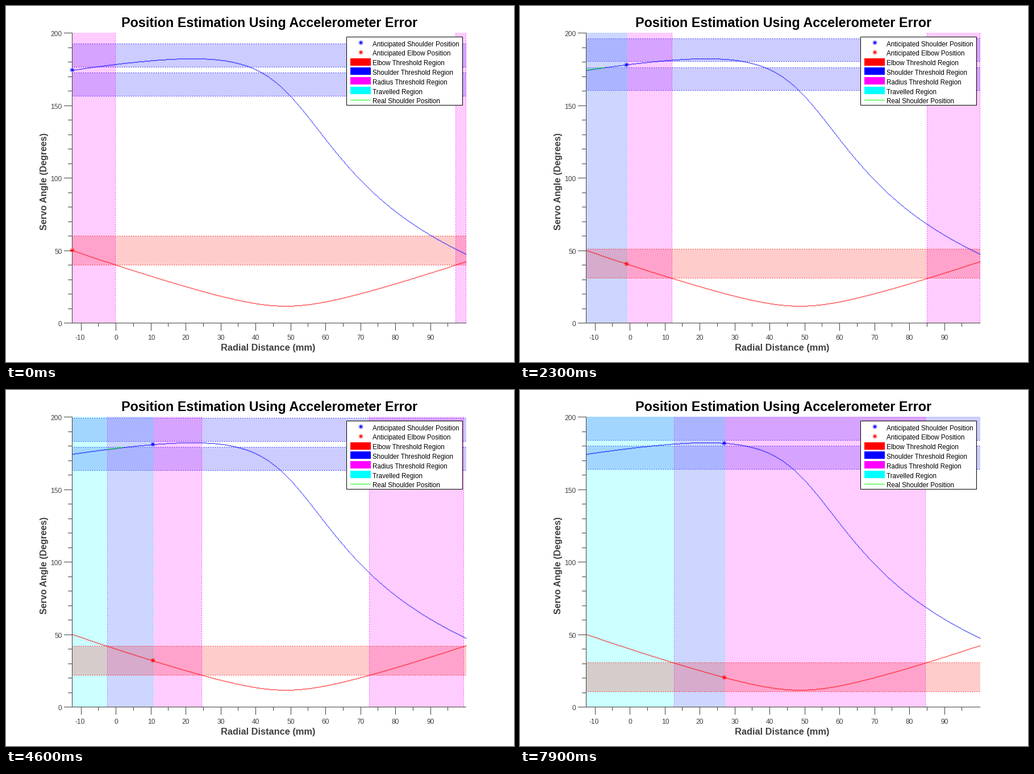
A matplotlib script for the animation above (8000 ms loop, 894 by 626 pixels).

```python
import numpy as np
import matplotlib.pyplot as plt
from matplotlib.animation import FuncAnimation
from matplotlib.patches import Rectangle

W, H, DPI = 894, 626, 72
XMIN, XMAX = -12.5, 100.2
MID = 48.55                    # radius at which the elbow angle is smallest
FRAMES, STEP = 80, 0.5
BLUE, RED, MAGENTA, CYAN, GREEN = "#0000ff", "#ff0000", "#ff00ff", "#00ffff", "#00ff00"
GRAY = "#404040"

plt.rcParams["font.family"] = "Liberation Sans"
fig = plt.figure(figsize=((W + 0.001) / DPI, (H + 0.001) / DPI), dpi=DPI, facecolor="white")
ax = fig.add_axes([0, 0, 1, 1])
ax.axis("off")


def px(x):
    return 193.5 + 6.15 * x


def py(v):
    return 557.5 - 2.55 * v


def center(p):
    """Middle of the pixel that holds p."""
    return np.floor(p) + 0.5


# Two-link arm: law of cosines for both servo angles.
def elbow(x):
    return np.degrees(np.arccos(1 - ((x - MID) ** 2 + 233) / 11014))


def elbow_offset(angle):
    """Distance from MID at which the elbow reaches the angle."""
    return np.sqrt(max(0, 11014 * (1 - np.cos(np.radians(angle))) - 233))


def shoulder(x):
    u = x - MID
    d = np.hypot(u, 24.05)
    bend = np.arccos((d * d - 2752) / (131.16 * d))
    return np.degrees(bend - np.arctan(u / 24.05)) + 26.35


def line(xs, ys, color, z):
    ax.plot(xs, ys, color=color, lw=1, zorder=z, snap=False)


def dots(xs, ys, color, z):
    return ax.plot(xs, ys, color=color, lw=1, ls=(0, (1, 3)),
                   dash_capstyle="butt", snap=False, zorder=z)[0]


def box(x0, y0, x1, y1, color, z, alpha=1.0):
    return ax.add_patch(Rectangle((x0, y0), x1 - x0, y1 - y0, fc=color, lw=0,
                                  alpha=alpha, zorder=z, snap=False))


def star(x, y, color, z):
    x, y, gap = center(x), center(y), np.nan
    dx = np.array([-4, 4, gap, 0, 0, gap, -3, 3, gap, -3, 3])
    dy = np.array([0, 0, gap, -4, 4, gap, -3, 3, gap, 3, -3])
    return ax.plot(x + dx, y + dy, color=color, lw=1, zorder=z, snap=False,
                   solid_capstyle="butt")[0]


def trace(f, a, b, color, z):
    """Crisp one-pixel curve: one run of pixels in each column."""
    cols = np.arange(np.floor(px(a)), np.floor(px(b)) + 2)
    rows = np.floor(py(f((cols + 0.5 - 193.5) / 6.15)))
    jump = np.diff(rows, append=rows[-1])
    size = np.maximum(1, np.abs(jump))
    top = np.where(jump < 0, rows - size + 1, rows)
    return ax.fill_between(cols, top, top + size, step="post", color=color, lw=0, zorder=z)


def label(x, y, s, size, color="black", ha="center", **kw):
    ax.text(x, y, s, fontsize=size, color=color, ha=ha, va="baseline", zorder=12, **kw)


def draw_axes():
    line([116.5, 116.5], [47.5, 557.5], GRAY, 6)
    line([116.5, 809.5], [557.5, 557.5], GRAY, 6)
    for v in range(0, 201, 10):
        y = center(py(v))
        major = v % 50 == 0
        line([102.5 if major else 109.5, 116.5], [y, y], GRAY, 6)
        if major:
            label(98.5, y + 5, str(v), 12, GRAY, "right")
    for x in range(-10, 96, 5):
        c = center(px(x))
        major = x % 10 == 0
        line([c, c], [557.5, 570.5 if major else 563.5], GRAY, 6)
        if major:
            label(c - (2 if x < 0 else 0), 586.5, str(x), 12, GRAY)
    label(463.5, 37, "Position Estimation Using Accelerometer Error", 23.35, weight="bold")
    label(461.5, 605.5, "Radial Distance (mm)", 16.4, GRAY, weight="bold")
    label(71.5, 308, "Servo Angle (Degrees)", 16.05, GRAY, weight="bold",
          rotation=90, rotation_mode="anchor")


def draw_legend():
    ax.add_patch(Rectangle((599.5, 54.5), 204, 120, fc="white", ec="black", lw=1,
                           zorder=10, snap=False))
    names = ["Anticipated Shoulder Position", "Anticipated Elbow Position",
             "Elbow Threshold Region", "Shoulder Threshold Region",
             "Radius Threshold Region", "Travelled Region", "Real Shoulder Position"]
    for i, name in enumerate(names):
        label(645, 70.5 + 16.8 * i, name, 11.65, ha="left")
    star(624, 64, BLUE, 11)
    star(624, 81, RED, 11)
    for i, color in enumerate([RED, BLUE, MAGENTA, CYAN]):
        y = round(91.5 + 16.8 * i)
        box(606, y, 642, y + 13, color, 11)
    line([606.5, 641.5], [165.5, 165.5], GREEN, 11)


def radius_spans(e):
    """Radii whose elbow angle lies within 10 degrees of e."""
    far, near = elbow_offset(e + 10), elbow_offset(e - 10)
    lo, hi = max(XMIN, MID - far), min(XMAX, MID + far)
    if near == 0:
        return [(lo, hi)]
    return [(lo, MID - near), (MID + near, hi)]


live = []


def update(i):
    while live:
        live.pop().remove()
    x = XMIN + STEP * i
    s, e = shoulder(x), elbow(x)
    spans = radius_spans(e)

    def column(a, b, color, z):
        live.append(box(np.floor(px(a)), 47, np.floor(px(b)) + 1, 558, color, z, 0.2))
        for v in (a, b):
            c = center(px(v))
            live.append(dots([c, c], [48, 558], color, z + 0.5))

    def band(a, b, color, z):
        top = np.floor(py(min(b, 200)))
        live.append(box(116, top, 810, np.floor(py(a)) + 1, color, z, 0.2))
        for v in (a, b):
            if v <= 200:
                c = center(py(v))
                live.append(dots([116, 810], [c, c], color, z + 0.5))

    band(s - 18, s - 2, BLUE, 1)
    band(s + 2, s + 18, BLUE, 1)
    for a, b in spans:
        column(a, b, MAGENTA, 2)
    if i:
        column(XMIN, x, CYAN, 3)
    band(e - 10, e + 10, RED, 4)

    # Travelled part of the curve that fits both thresholds.
    xs = np.linspace(spans[0][0], min(x, spans[0][1]), 300)
    xs = xs[np.abs(shoulder(xs) - s + 10) <= 8]
    if i and len(xs) > 1:
        live.append(trace(shoulder, xs[0], xs[-1], GREEN, 5.5))

    live.append(star(px(x), py(s), BLUE, 8))
    live.append(star(px(x), py(e), RED, 8))
    return live


draw_axes()
draw_legend()
trace(shoulder, XMIN, XMAX, BLUE, 5)
trace(elbow, XMIN, XMAX, RED, 5)
ax.set(xlim=(0, W), ylim=(H, 0), autoscale_on=False)
anim = FuncAnimation(fig, update, frames=FRAMES, init_func=lambda: [],
                     interval=100, repeat=True, blit=False)
plt.show()
```
